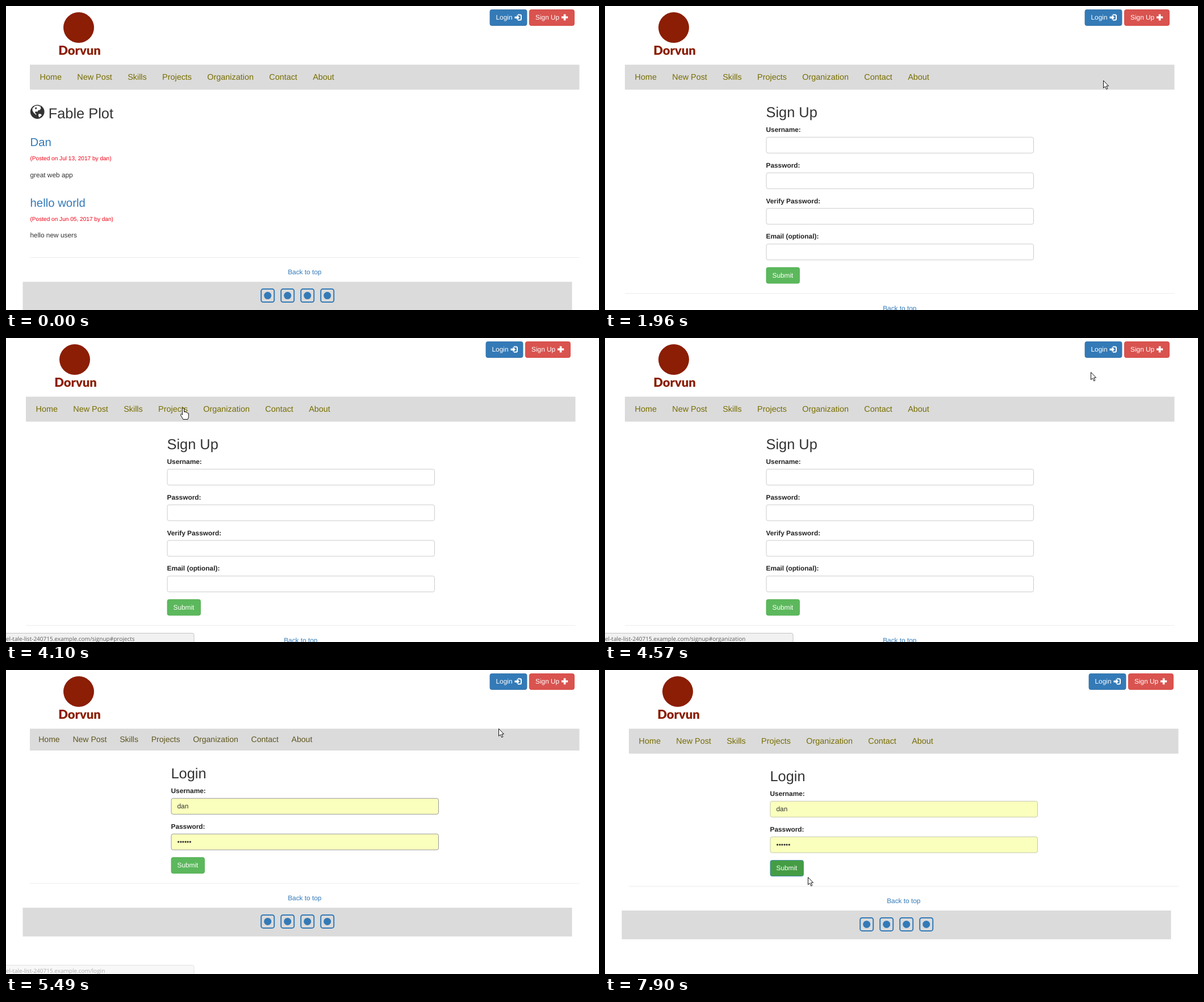
These frames come from a looping animation (1044x536 px, 7.99 s). An HTML page:

```html
<!DOCTYPE html>
<html lang="en">
<head>
<meta charset="utf-8">
<title>Blog sign-in</title>
<style>
  html, body { margin: 0; width: 100%; height: 100%; overflow: hidden; background: #fff; }
  svg { display: block; width: 100vw; height: 100vh; }
  text { font-family: "Liberation Sans", Arial, sans-serif; text-rendering: geometricPrecision; white-space: pre; }
  .brand { font-family: Lato, sans-serif; font-weight: 900; }
  .status { font-family: "Open Sans", sans-serif; }
  .label { font-weight: bold; }
  .primary rect, .danger rect, .success rect { stroke-width: .85; }
  .primary rect { fill: #337ab7; stroke: #2e6da4; }
  .primary.on rect { fill: #286090; stroke: #204d74; }
  .danger rect { fill: #d9534f; stroke: #d43f3a; }
  .danger.on rect { fill: #c9302c; stroke: #ac2925; }
  .success rect { fill: #5cb85c; stroke: #4cae4c; }
  .success.on rect { fill: #449d44; stroke: #398439; }
  .success.focus rect { stroke: #3f82b8; }
  .field { fill: #fff; stroke: #ccc; }
  .filled .field { fill: #faffbd; stroke: #c4c6ad; }
  .compact .filled .field { stroke: #999; }
</style>
</head>
<body>
<svg id="stage" viewBox="0 0 1044 536" preserveAspectRatio="none"></svg>
<script>
const LOOP = 7990;
const BODY = 11.87, HEAD = 25.4, TITLE = 20.35, SMALL = 10.1;
const BLUE = '#337ab7', GREY = '#dbdbdb', RED = '#8b1e04';
const HOST = 'el-tale-list-240715.example.com/';

const text = (x, y, str, size = BODY, fill = '#333', extra = '') =>
  `<text x="${x}" y="${y}" font-size="${size}" fill="${fill}" ${extra}>${str}</text>`;
const rect = (x, y, w, h, extra = '') =>
  `<rect x="${x}" y="${y}" width="${w}" height="${h}" ${extra}/>`;
const group = (id, inner, cls = '') => `<g id="${id}" class="${cls}">${inner}</g>`;

const button = (id, kind, x, y, w, label, icon = '') =>
  group(id, rect(x + .5, y + .5, w - 1, 28, 'rx="3.2"') + text(x + 11, y + 18.2, label, BODY, '#fff') + icon, kind);

const loginIcon = `<path d="M901 15.4h4a2 2 0 0 1 2 2v5.4a2 2 0 0 1-2 2h-4" fill="none" stroke="#fff" stroke-width="2"/>
  <path d="M895.5 18.4h4V15.6l4.8 4.6-4.8 4.6V22h-4z" fill="#fff"/>`;
const plusIcon = '<path d="M978 20h11.2M983.6 14.4v11.2" stroke="#fff" stroke-width="3.6"/>';
const globe = `<circle cx="55.2" cy="186.6" r="12.4" fill="#333"/>
  <path d="M46.5 180.5l4-4 4.5-1 5.5 1.5 1 3.5-2 3-3 .5-1 2.5-3.5-.5-1 2.5 2.5 2-.5 1.5-4-3.5-2.5-4z
  M57.5 190l4 .5 1.5 2-4.5 4-1.5-3z" fill="#fff"/>
  <path d="M51 179.5l2.5-1 1 2-2.5 2z" fill="#333"/>`;

const NAV = ['Home', 'New Post', 'Skills', 'Projects', 'Organization', 'Contact', 'About'];
function nav(id, height, x, y, size, gap, fill) {
  const items = NAV.map((s, i) => i ? `<tspan dx="${gap}">${s}</tspan>` : s).join('');
  return group(id, rect(42, 103.5, 967.5, height, `fill="${GREY}"`) + text(x, y, items, size, fill));
}

function footer(y) {
  let out = rect(42, y - .5, 967.5, 1, 'fill="#ebebeb"') +
    text(525.8, y + 29.7, 'Back to top', BODY, BLUE, 'text-anchor="middle"') +
    rect(29.5, y + 42.8, 967, 50.7, `fill="${GREY}"`);
  for (let i = 0; i < 4; i++) {
    const x = 460.7 + 35 * i;
    out += rect(x - 11.5, y + 55.6, 23, 23, `rx="3.5" fill="none" stroke="${BLUE}" stroke-width="2"`) +
      `<circle cx="${x}" cy="${y + 67.1}" r="6.5" fill="${BLUE}"/>`;
  }
  return out;
}

const post = (y, title, date, body) =>
  text(42.5, y, title, TITLE, BLUE) +
  text(42.5, y + 24.8, `(Posted on ${date} by dan)`, SMALL, '#f00014') +
  text(42.5, y + 54.6, body);

const field = (i, label, value = '') =>
  text(290.5, 222 + 62.8 * i, label, BODY, '#222', 'class="label"') +
  rect(291, 231.3 + 62.8 * i, 470.5, 28, 'rx="3.2" class="field"') +
  text(301.5, 249.3 + 62.8 * i, value, BODY, '#333');

const form = (title, fields) =>
  text(290.5, 196, title, HEAD) + fields.map((f, i) => field(i, ...f)).join('');

const pages = {
  home: globe + text(74.7, 198.3, 'Fable Plot', HEAD) +
    post(247, 'Dan', 'Jul 13, 2017', 'great web app') +
    post(353.7, 'hello world', 'Jun 05, 2017', 'hello new users') + footer(443.5),
  signup: form('Sign Up', [['Username:'], ['Password:'], ['Verify Password:'], ['Email (optional):']]) +
    button('signupSubmit', 'success', 290.5, 460.5, 59.5, 'Submit') + footer(506.8),
  login: group('', form('Login', [['Username:', 'dan'], ['Password:', '••••••']]), 'filled') +
    button('loginSubmit', 'success', 290.5, 335, 59.5, 'Submit') + footer(381.3)
};

const cursors = {
  arrow: '<path d="M.5.5V13.6L3.5 10.8 5.8 15.8 7.9 14.8 5.7 10H9.6Z" fill="#fff" stroke="#111"/>',
  hand: `<path d="M-1.6 12.5V2Q-1.6.5 0 .5T1.6 2V7.2Q4.4 6.6 4.7 8.2 7 7.8 7.2 9.2 9.5 9 9.5 11V14.5Q9.5 17 8 20.5H-.2
    Q-1.5 17.5-4.2 13.6-5.2 11.4-3.6 11-2.6 11-1.6 12.5Z" fill="#fff" stroke="#111"/>`,
  beam: '<path d="M-2.5-6.5H-.5L0-6 .5-6.5H2.5M0-6V6.5M-2.5 7H-.5L0 6.5 .5 7H2.5" fill="none" stroke="#111"/>'
};

document.getElementById('stage').innerHTML =
  rect(0, 0, 1044, 536, 'fill="#fff"') +
  group('page',
    `<circle cx="128" cy="38" r="27" fill="${RED}"/>` +
    text(129.5, 85.5, 'Dorvun', 22, RED, 'class="brand" text-anchor="middle"') +
    button('loginButton', 'primary', 851.5, 6, 66, 'Login', loginIcon) +
    button('signupButton', 'danger', 921, 6, 80, 'Sign Up', plusIcon) +
    nav('navWide', 44, 59.6, 129.5, 14.4, 27.3, '#776d00') +
    nav('navCompact', 38.5, 57.2, 127.2, 14.05, 22.7, '#5e5620') +
    group('content', Object.entries(pages).map(([id, inner]) => group(id, inner)).join(''))) +
  group('status', '<path d="M-2 520.5H328a3 3 0 0 1 3 3V540H-2Z" fill="#f1f1f1" stroke="#c4c4c4"/>' +
    text(0, 533.6, '', 10, '#5c5c5c', 'id="statusText" class="status"')) +
  group('cursor', Object.entries(cursors).map(([id, inner]) => group(id, inner)).join(''));

const el = id => document.getElementById(id);
const show = (id, on) => { el(id).style.display = on ? '' : 'none'; };
const within = (v, a, b) => v >= a && v < b;

// time, x, y of the pointer tip
const PATH = [
  [70, 957, 251], [150, 957, 251], [470, 955, 2], [690, 948, 20], [1330, 948, 20],
  [1650, 878, 132], [1730, 877, 131], [2200, 877, 131], [2500, 560, 330], [2780, 300, 484],
  [2920, 320, 470], [2990, 345, 455], [3070, 370, 440], [3330, 710, 61], [3400, 710, 61],
  [3480, 775, 37], [3790, 218, 118], [3950, 232, 122], [4250, 390, 124], [4570, 855, 60],
  [4640, 855, 60], [4710, 872, 20], [4790, 879, 20], [5250, 879, 20], [5410, 867, 103],
  [5830, 867, 103], [6000, 690, 190], [6240, 350, 276], [6410, 323, 252], [6660, 323, 252],
  [6970, 313, 342], [7270, 313, 342], [7280, 317, 346], [7600, 317, 346], [7890, 357, 365]
];

// start, end, address
const STATUS = [
  [860, 1900, 'signup'], [3870, 4100, 'signup#skills'], [4000, 4300, 'signup#projects'],
  [4170, 4800, 'signup#organization'], [4710, 5570, 'login']
];

function pointerAt(t) {
  const i = PATH.findIndex(k => k[0] > t);
  if (i === 0) return PATH[0].slice(1);
  if (i < 0) return PATH[PATH.length - 1].slice(1);
  const [t0, x0, y0] = PATH[i - 1], [t1, x1, y1] = PATH[i];
  const p = (t - t0) / (t1 - t0);
  return [x0 + (x1 - x0) * p, y0 + (y1 - y0) * p].map(Math.round);
}

function draw(t) {
  const page = t < 1800 ? 'home' : t < 5400 ? 'signup' : 'login';
  const shift = page === 'signup' ? -7 : 0;
  const compact = within(t, 1800, 1890) || within(t, 5400, 5640);
  for (const id in pages) show(id, id === page);
  el('page').setAttribute('transform', `translate(${shift})`);
  el('page').setAttribute('class', compact ? 'compact' : '');
  el('content').setAttribute('transform', `translate(0 ${compact ? -5 : 0})`);
  show('navWide', !compact);
  show('navCompact', compact);

  const [x, y] = pointerAt(t);
  const px = x - shift;
  const submitY = page === 'signup' ? 460 : 335;
  const onSubmit = page !== 'home' && within(px, 290, 350) && within(y, submitY, submitY + 29);
  const onTop = within(px, 851, 1001) && y < 35;
  const onNav = within(px, 46, 590) && within(y, 112, 138);
  const rows = { home: 0, signup: 4, login: 2 }[page];
  const row = Math.floor((y - 231) / 62.8);
  const onField = within(px, 290, 762) && within(row, 0, rows) && y - 231 - row * 62.8 < 29;
  const kind = onSubmit || onTop || onNav ? 'hand' : onField ? 'beam' : 'arrow';

  show('cursor', within(t, 70, 150) || t >= 470);
  el('cursor').setAttribute('transform', `translate(${x} ${y})`);
  for (const id in cursors) show(id, id === kind);

  const pressed = t >= 7600;
  el('signupButton').classList.toggle('on', within(t, 470, 1800));
  el('loginButton').classList.toggle('on', within(t, 4710, 5400));
  el('signupSubmit').classList.toggle('on', onSubmit);
  el('loginSubmit').classList.toggle('on', onSubmit || pressed);
  el('loginSubmit').classList.toggle('focus', pressed);

  const link = STATUS.filter(s => s[0] <= t).pop();
  const opacity = link ? Math.max(0, Math.min(1, (link[1] - t) / 160)) : 0;
  el('status').setAttribute('opacity', opacity);
  if (link) el('statusText').textContent = HOST + link[2];
}

const start = performance.now();
function tick() {
  draw((performance.now() - start) % LOOP);
  requestAnimationFrame(tick);
}
tick();
</script>
</body>
</html>
```
